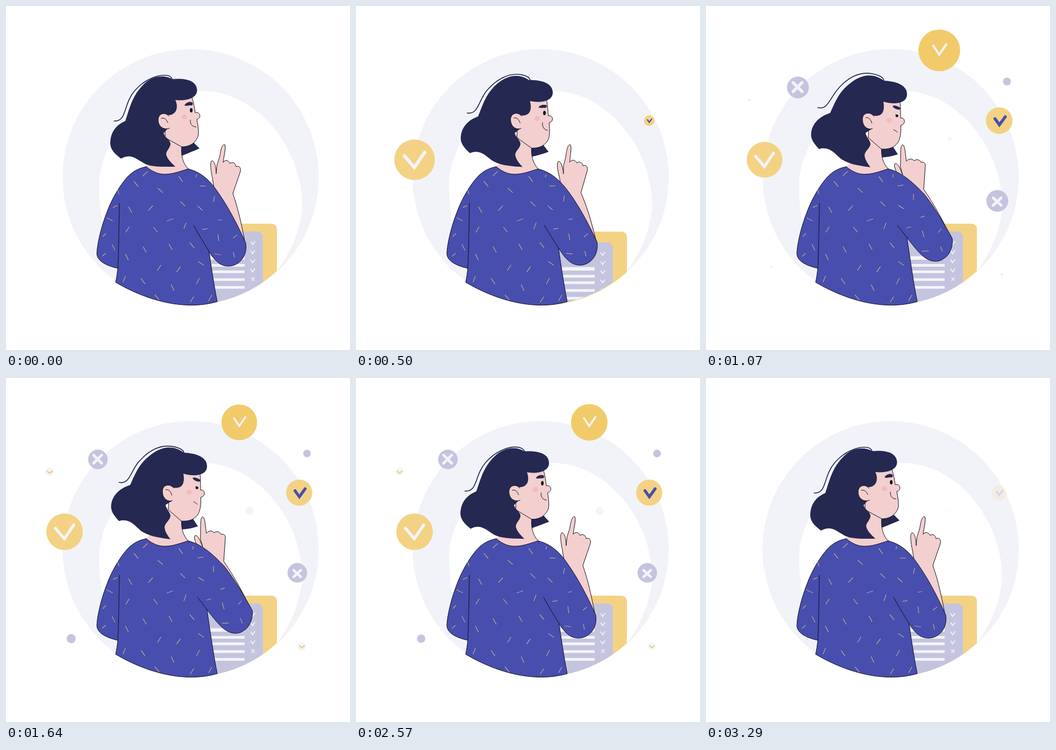
An HTML page that plays this animation: 640x640 px, repeating every 3.78 s.

```html
<!DOCTYPE html>
<html lang="en">
<head>
<meta charset="utf-8">
<title>Thinking about the checklist</title>
<style>
  html, body { margin: 0; width: 100%; height: 100%; overflow: hidden; background: #fff; }
  svg { display: block; width: 100vw; height: 100vh; }
  .line { stroke: #0d0d18; stroke-width: 1; stroke-linejoin: round; stroke-linecap: round; }
  .open { fill: none; }
  .skin { fill: #f3cfcf; }
  .hair { fill: #252850; }
  .shirt { fill: #484eae; }
  .fleck { stroke: #d6bd80; stroke-width: 1; }
  .mark { fill: none; stroke-linecap: round; stroke-linejoin: miter; }
</style>
</head>
<body>
<svg viewBox="0 0 640 640">
  <defs>
    <clipPath id="disc"><circle cx="343.5" cy="318.5" r="238.5"/></clipPath>
    <clipPath id="inner"><circle cx="343.5" cy="318.5" r="237.3"/></clipPath>
  </defs>

  <g clip-path="url(#disc)">
    <circle cx="343.5" cy="318.5" r="238.5" fill="#f2f3f9"/>
    <path fill="#fff" d="M368 158C452 160 522 232 544 318C549 338 551 352 551 375C547 420 528 462 500 499L420 570L250 570C205 500 173 420 173 335C173 240 265 158 368 158Z"/>
    <g id="folder"><g clip-path="url(#inner)">
      <rect x="350" y="405" width="154" height="190" rx="9.5" fill="#f3d284"/>
    </g></g>
    <g clip-path="url(#inner)"><g id="sheet">
      <rect x="350" y="419.5" width="128" height="190" rx="11" fill="#c4c4df"/>
      <path fill="#f3f4f9" d="M360 465.5H444V472H360ZM360 480H444V485H360ZM360 492H444V497H360ZM360 506.5H444V511.5H360ZM360 521H444V526H360Z"/>
      <g id="ticks" class="mark" stroke="#f3f4f9" stroke-width="1.7"></g>
    </g></g>
  </g>

  <path id="tuft" class="hair"/>
  <path class="skin" d="M261 299C275 310 285 314 297 314C312 314 325 308 339 303C329 293 325 278 327 260L285 230L275 285Z"/>
  <path class="line open" d="M339 303C329 293 325 278 327 260"/>
  <path id="arm" class="skin line"/>
  <path class="shirt line" d="M261 299C273 309 284 313 295 313C311 313 325 307 339 303L374 432C380 472 386 515 393 550C335 567 265 550 204 514C206 505 207 496 208 488C190 484 169 476 169 460C170 440 178 408 188 383C197 358 213 332 226 318C237 306 250 301 261 299Z"/>
  <path class="line open" d="M208 488C210 450 210 410 211 367"/>
  <g id="flecks" class="fleck"></g>
  <path id="sleeve" class="shirt line"/>
  <g id="sleeveFlecks" class="fleck"></g>

  <path id="face" class="skin line"/>
  <ellipse id="cheek" rx="5" ry="4.5" fill="#f0bcbd"/>
  <path id="hair" class="hair"/>
  <path id="strand" class="open" stroke="#252850" stroke-width="1.7" stroke-linecap="round"/>
  <path id="ear" class="skin line"/>
  <path id="earFold" class="line open"/>
  <path id="brow" class="hair"/>
  <ellipse id="eye" fill="#0d0d18"/>
  <path id="lash" class="line open" d="M353 201.5L354 204.5"/>
  <path id="mouth" class="line open"/>
  <g id="badges"></g>
</svg>

<script>
const $ = id => document.getElementById(id);
const LOOP = 3780, STEP = 1000 / 14, LAST = 46;

const clamp = x => Math.min(1, Math.max(0, x));
const lerp = (a, b, t) => a + (b - a) * t;
const ease = (t, from, to) => (1 - Math.cos(Math.PI * clamp((t - from) / (to - from)))) / 2;

// Blends two paths that share the same commands.
function mix(a, b, t) {
  const ends = b.match(/-?[\d.]+/g);
  let i = 0;
  return a.replace(/-?[\d.]+/g, n => lerp(+n, +ends[i++], t).toFixed(2));
}

// Piecewise linear curve through [time, value] pairs.
function track(keys, t) {
  if (t <= keys[0][0]) return keys[0][1];
  for (let i = 1; i < keys.length; i++) {
    const [t0, v0] = keys[i - 1], [t1, v1] = keys[i];
    if (t < t1) return lerp(v0, v1, (t - t0) / (t1 - t0));
  }
  return keys[keys.length - 1][1];
}

// Head turned away, then turned towards the hand.
const head = {
  tuft: ['M327 260L349 254L360 265C346 271 336 275 326 279Z',
         'M326 265L348 262L357 276C345 280 335 281 326 282Z'],
  face: ['M346 170C349 180 351 190 352 198.5C362 196 364 209 355 211C358 228 360 240 355 247C349 258 338 262 327 262L296 245L296 180L318 160',
         'M361 178C362 190 362 199 362 208.5C371 207 372 220 362.5 222C363 238 361 247 357 254C349 265 338 267 326 266L302 245L304 185L331 165'],
  hair: ['M309 136C331 134 355 137 355.5 157C355 172 335 177 315 175C321 187 318 203 302 203L300 229L293 237C296 245 306 249 306 257C305 265 298 269 298 276C300 285 308 292 315 299C300 299 275 300 262 295C245 288 235 272 214 284C205 277 194 268 194 256C194 235 205 221 222 214C230 190 235 165 258 144C272 130 295 127 309 136Z',
         'M331 139C352 140 374 146 374 164C374 182 350 184 330 178C333 195 329 207 311 204L308 229L297 236C297 243 306 250 306 257C305 265 295 270 295 278C296 287 301 293 306 300C292 298 268 296 252 285C240 275 230 260 210 266C203 258 195.500 250 195.500 239C196 221 209 206 231 199C240 180 246 163 262 149C284 128 309 122 331 139Z'],
  ear: ['M303 205C296 196 283 200 283 212C283 222 290 229 299 228.500L304 227.500',
        'M312.500 205C304 195 291 199 291 211C291 222 298 229 306 229L309.500 228'],
  earFold: ['M289 209C295 207 299 212 301 217', 'M297 208C303 206 307 212 308.500 218'],
};
const strand = [
  'M201 214C226 215 217 183 240 157C258 136 285 126 302 129.500C305 130.500 308 133 309 136',
  'M211 195.500C231 199 232 175 246 158C262 139 285 123 312 128C322 130 330 134 331 139'];
const strandLift = 'M208 189C226 194 231 171 245 155C260 137 281 121 310 126C322 129 330 132 331 139';

// Hand pointing up, then resting at the chin.
const arm = {
  arm: ['M446 447C438 405 432 377 422 349L436 308C438 301 433 296 428 299C427 292 421 289 417 293C414 287 408 285 404 291C405 280 410 263 407 258C402 256 399 270 398 278C396 286 394 291 392.500 296L391 312C391 303 389 288 383 288C379 290 381 306 384 320L388 345L425 420',
        'M458 436C445 407 426 371 405 341L408 299C409 293 405 289 400 291C398 286 392 284 387 288C384 283 376 284 373 289C371 280 371 260 366 258C362 259 362 270 362 280C362 287 362 293 361.500 299L366 314C362 306 358 292 352 293C348 296 353 306 357 315L362 325L425 420'],
  sleeve: ['M339 303C366 310 381 327 394 346C413 373 430 405 446 441C450 466 433 484 414 484C399 484 389 475 378 457C367 440 358 424 349 408',
           'M339 303C364 309 385 328 406 350C425 374 443 405 458 432C461 455 446 475 427 475C411 475 399 462 389 450C377 436 367 421 356 408'],
};

const brow = ['M332 185C335 179 343 177 347 180C348 183 347 185 345 185C341 184 337 187 332 185Z',
              'M345 191C349 187 355 187 361 188.500C361 192 359 193 356 193.500C352 193 349 193 345 191Z'];
const browSad = 'M347 186C350 184 357 186 362 190C362 193 359 193 356 192.500C352 191 349 190 347 186Z';
const mouth = ['M343 212C342 220 347 225 353.500 225', 'M350 221C349 229 353 235 358.500 236'];
const mouthSad = 'M349 230C351 231 354 233 356 235';

// x, y, angle
const flecks = [
  [259, 312, -45], [242, 331, 50], [209, 346, 75], [203, 373, -25], [231, 379, 60], [269, 376, -48],
  [287, 343, 42], [325, 322, 54], [329, 368, 43], [305, 398, -20], [333, 409, -70], [278, 416, 52],
  [226, 416, -58], [193, 397, 27], [183, 426, -45], [200, 449, 63], [182, 463, -42], [225, 467, 64],
  [258, 453, 60], [306, 448, 60], [346, 445, 50], [285, 487, -58], [321, 490, -55], [363, 479, 35],
  [357, 512, -63], [220, 508, -68], [255, 512, 55], [310, 524, 65], [281, 542, 50], [346, 546, -58],
  [380, 543, -60]];
// x, y, angle at rest, then x, y with the arm folded
const sleeveFlecks = [
  [354, 316, -75, 348, 316], [366, 335, 0, 362, 334], [387, 359, -80, 386, 355], [361, 376, 42, 363, 374],
  [398, 398, -9, 403, 392], [370, 415, -8, 377, 412], [395, 431, 83, 404, 424], [426, 429, -38, 435, 418],
  [394, 462, 8, 408, 456], [424, 463, 78, 438, 452]];
const short = new Set([2, 3, 14, 16]);
const dash = half => `<path d="M${-half} 0H${half}"/>`;
const place = (x, y, deg) => `translate(${x} ${y}) rotate(${deg})`;

$('flecks').innerHTML = flecks.map(([x, y, deg], i) =>
  `<g transform="${place(x, y, deg)}">${dash(short.has(i) ? 4.3 : 6.3)}</g>`).join('');
$('sleeveFlecks').innerHTML = sleeveFlecks.map((f, i) =>
  `<g>${dash([3, 5.5, 5.5, 6, 4, 4.7, 6.3, 4.8, 6.3, 5][i])}</g>`).join('');
$('ticks').innerHTML = [441, 458, 475, 492].map(y =>
  `<path d="M455.500 ${y - 2.5}l3.300 5.300l4.200 -6"/>`).join('') + '<path d="M457 505.500l5 5m0 -5l-5 5"/>';

const PALE = '#f3f4f9', LILAC = '#c4c4df', GOLD = '#f3d284';
const badges = [
  { x: 109, y: 286, r: 34, fill: GOLD, d: 'M-17 -6.500L-.5 13L17 -12.500', ink: PALE, w: 5.6, start: 185, end: 2790 },
  { x: 434, y: 82.5, r: 34, fill: '#f1cb6a', d: 'M-9.800 -7.500L0 7L11.500 -10', ink: PALE, w: 3.5, start: 740, end: 2860 },
  { x: 545.5, y: 213.2, r: 24.3, fill: GOLD, d: 'M-7.800 -3.500L.3 7.800L11 -7', ink: '#484eae', w: 5.4, start: 390, end: 3000 },
  { x: 171, y: 151.5, r: 18.2, fill: LILAC, d: 'M-8 -8L7 7M7 -8L-8 7', ink: PALE, w: 5, start: 493, end: 2860 },
  { x: 542, y: 362.5, r: 18.2, fill: LILAC, d: 'M-7 -5L6.500 7.500M6.500 -5L-7 7.500', ink: PALE, w: 4.5, start: 493, end: 2860 },
  { x: 560, y: 140.5, r: 7.2, fill: LILAC, start: 800, end: 2860 },
  { x: 453.3, y: 247.2, r: 7.5, fill: PALE, start: 960, end: 3000 },
  { x: 121.2, y: 485, r: 7.7, fill: LILAC, start: 1040, end: 2860 },
  { x: 81, y: 174.5, r: 7.5, fill: PALE, d: 'M-4 -1L0 2.500L4.500 -1.300', ink: '#f1cb6a', w: 2, start: 985, end: 2860 },
  { x: 550.3, y: 499.3, r: 7.5, fill: PALE, d: 'M-4 -1L0 2.500L4.500 -1.300', ink: '#f1cb6a', w: 2, start: 985, end: 2860 }];
const pop = [[0, 0], [110, .41], [180, .7], [270, 1.02], [350, 1.18], [520, 1.15], [590, 1.11],
             [680, 1.02], [885, .975], [1150, 1]];

$('badges').innerHTML = badges.map(b => `<g><circle r="${b.r}" fill="${b.fill}"/>` +
  (b.d ? `<path class="mark" d="${b.d}" stroke="${b.ink}" stroke-width="${b.w}"/>` : '') + '</g>').join('');

const setPath = (id, d) => $(id).setAttribute('d', d);
const setAttrs = (el, attrs) => { for (const k in attrs) el.setAttribute(k, attrs[k]); };

function draw(t) {
  const turn = ease(t, 140, 800) - ease(t, 2214, 2720);
  const fold = ease(t, 300, 970) - ease(t, 1714, 2340);
  const mood = ease(t, 600, 880) - ease(t, 1800, 2130);
  const lift = track([[200, 0], [500, .3], [1070, 1], [1640, .2], [2200, 0]], t);
  const dip = ease(t, 0, 300) - ease(t, 300, 900);

  for (const id in head) setPath(id, mix(...head[id], turn));
  for (const id in arm) setPath(id, mix(...arm[id], fold));
  setPath('strand', mix(mix(...strand, turn), strandLift, lift));
  setPath('brow', mix(mix(...brow, turn), browSad, mood));
  setPath('mouth', mix(mix(...mouth, turn), mouthSad, mood));
  setAttrs($('cheek'), { cx: lerp(332, 341, turn), cy: lerp(206, 212.5, turn) });
  setAttrs($('eye'), {
    cx: lerp(344.6, 355.2, turn), cy: lerp(194, 203, turn) + mood * 1.2,
    rx: 2.5, ry: lerp(4.1, 2.5, mood)
  });
  $('lash').setAttribute('opacity', mood > .6 ? 1 : 0);

  [...$('sleeveFlecks').children].forEach((el, i) => {
    const [x, y, deg, x2, y2] = sleeveFlecks[i];
    el.setAttribute('transform', place(lerp(x, x2, fold), lerp(y, y2, fold), deg - 9 * fold));
  });

  $('folder').setAttribute('transform', `translate(0 ${dip * 19.5})`);
  $('sheet').setAttribute('transform', `translate(0 ${dip * 27})`);

  [...$('badges').children].forEach((el, i) => {
    const b = badges[i], out = clamp((t - b.end) / 345);
    const size = track(pop, t - b.start) * (1 - out / 2);
    setAttrs(el, { transform: `translate(${b.x} ${b.y}) scale(${size})`, opacity: size ? 1 - out : 0 });
  });
}

const begin = performance.now();
let shown = -1;
function tick() {
  const t = (performance.now() - begin) % LOOP;
  const step = Math.min(LAST, Math.floor(t / STEP + .06));
  if (step !== shown) draw((shown = step) * STEP);
  requestAnimationFrame(tick);
}
tick();
</script>
</body>
</html>
```
